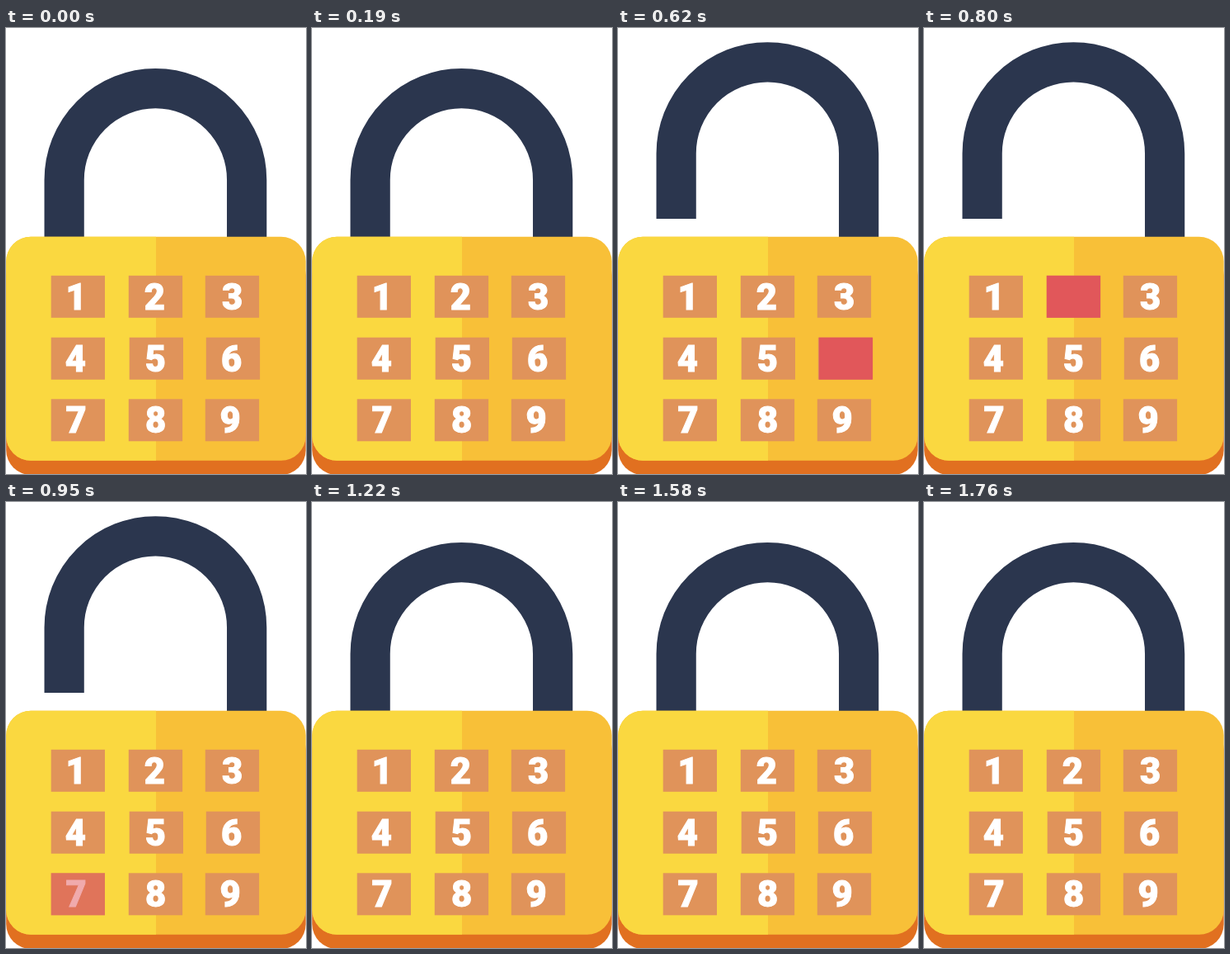
An HTML page with a canvas that plays this animation: 364x540 px, repeating every 1.85 s.

```html
<!DOCTYPE html>
<html lang="en">
<head>
<meta charset="utf-8">
<title>Padlock keypad</title>
<style>
  html, body { margin: 0; width: 100%; height: 100%; overflow: hidden; background: #fff; }
  canvas { display: block; width: 364px; height: 540px; }
</style>
</head>
<body>
<canvas id="stage" width="364" height="540"></canvas>
<script>
const ctx = document.getElementById('stage').getContext('2d');
const LOOP = 1850, BLINK = 30;
const OPEN_AT = 490, CLOSE_AT = 1130, LIFT = 32;
const KEY_W = 65.3, KEY_H = 51;

// [digit, start of half tint, start of full tint]
const presses = [[5, 30, 60], [1, 310, 340], [6, 490, 620]];
[2, 7, 4, 8, 3, 9].forEach((digit, i) => {
  const start = 770 + i * 180;
  presses.push([digit, start, start + BLINK]);
});

const rows = [
  { y: 299.8, base: 340.5, xs: [54.7, 148.8, 241.8], mids: [83, 180.3, 274.5] },
  { y: 374.7, base: 415.5, xs: [54.7, 149.7, 242.8], mids: [84.2, 181.3, 273.5] },
  { y: 449.3, base: 490, xs: [54.7, 148.8, 241.8], mids: [85, 181.5, 272] }
];

function tint(digit, t) {
  for (const [d, half, full] of presses) {
    if (d !== digit || t < half || t >= full + 2 * BLINK) continue;
    return t >= full && t < full + BLINK ? 1 : 0.5;
  }
  return 0;
}

function panel(y, fill) {
  ctx.beginPath();
  ctx.roundRect(0.2, y, 363.5, 271, 30);
  ctx.fillStyle = fill;
  ctx.fill();
}

function drawShackle(lift) {
  const mid = 181.4, r = 110.75, y = 184 - lift;
  ctx.beginPath();
  ctx.moveTo(mid - r, 263 - lift);
  ctx.lineTo(mid - r, y);
  ctx.arc(mid, y, r, Math.PI, 0);
  ctx.lineTo(mid + r, 275);
  ctx.lineWidth = 48.25;
  ctx.strokeStyle = '#2b364e';
  ctx.stroke();
}

function drawBody() {
  panel(270, '#e17020');
  panel(252.7, '#f8c038');
  ctx.save();
  ctx.beginPath();
  ctx.rect(0, 252, 182, 272);
  ctx.clip();
  panel(252.7, '#fad840');
  ctx.restore();
}

function drawDigit(digit, mid, base) {
  const m = ctx.measureText(digit);
  const x = mid - (m.actualBoundingBoxRight - m.actualBoundingBoxLeft) / 2;
  ctx.fillStyle = ctx.strokeStyle = '#fff';
  ctx.lineWidth = 1;
  ctx.fillText(digit, x, base);
  ctx.strokeText(digit, x, base);
}

function drawKey(row, col, digit, t) {
  const x = row.xs[col];
  ctx.fillStyle = '#e0935a';
  ctx.fillRect(x, row.y, KEY_W, KEY_H);
  drawDigit(digit, row.mids[col], row.base);

  const level = tint(digit, t);
  if (level) {
    ctx.globalAlpha = level;
    ctx.fillStyle = '#e1575a';
    ctx.fillRect(x + (col === 2 ? 1 : 0), row.y, KEY_W, KEY_H);
    ctx.globalAlpha = 1;
  }
}

function draw() {
  const t = performance.now() % LOOP;
  ctx.fillStyle = '#fff';
  ctx.fillRect(0, 0, 364, 540);
  drawShackle(t >= OPEN_AT && t < CLOSE_AT ? LIFT : 0);
  drawBody();
  ctx.font = '900 43.5px Roboto, "Noto Sans", sans-serif';
  rows.forEach((row, r) => {
    for (let col = 0; col < 3; col++) drawKey(row, col, r * 3 + col + 1, t);
  });
  requestAnimationFrame(draw);
}
draw();
</script>
</body>
</html>
```
